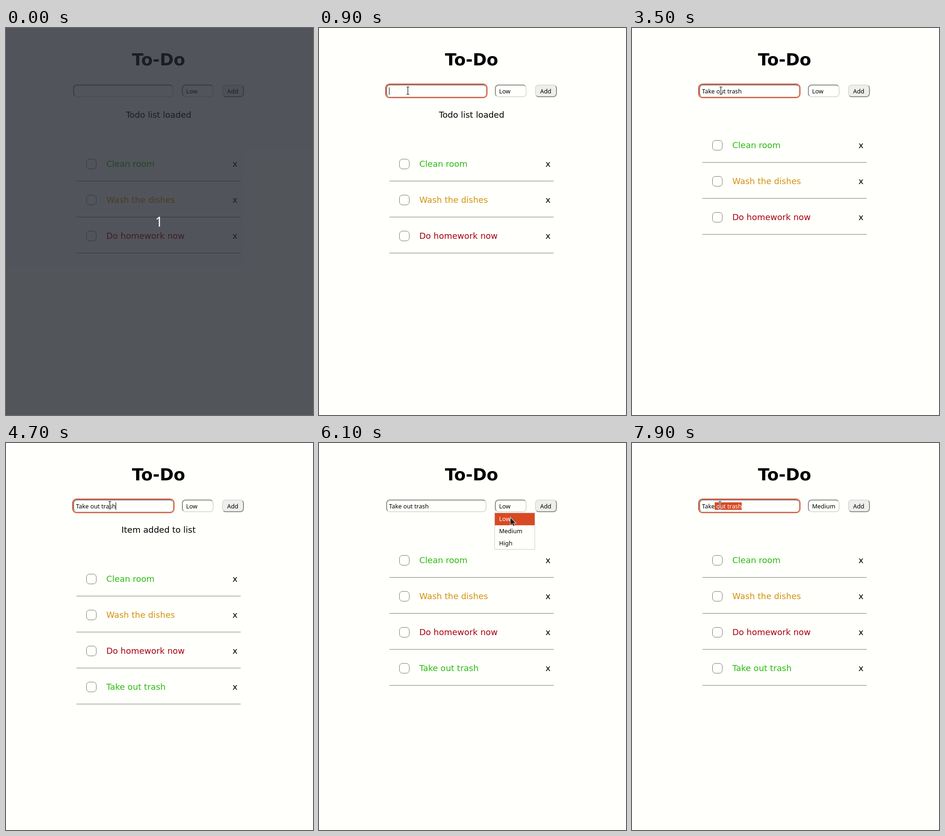
Animation of 658 by 828 pixels, one loop 8000 ms. Source, as an HTML page:

```html
<!DOCTYPE html>
<html lang="en">
<head>
<meta charset="utf-8">
<title>To-Do</title>
<style>
  html, body { margin: 0; width: 100%; height: 100%; overflow: hidden; background: #fffffc; }
  #stage { position: relative; width: 658px; height: 828px; overflow: hidden; }
  #stage > * { position: absolute; box-sizing: border-box; }
  .box { top: 121px; height: 27px; border: 2px solid; border-radius: 8px;
         border-color: #8f908c #dddeda #dddeda #8f908c; }
  #field { left: 144px; width: 215px; }
  #select { left: 377px; width: 68px; }
  #button { left: 463px; width: 47px; background: #eeefec;
            border-color: #dddeda #8f908c #8f908c #dddeda; }
  #ring { left: 142px; top: 119px; width: 219px; height: 31px;
          border: 2px solid #d2492a; border-radius: 9px; }
  svg { left: 0; top: 0; }
  text { font: 18px "DejaVu Sans", sans-serif; white-space: pre; }
  .ui { font: 12.8px "Noto Sans", sans-serif; }
</style>
</head>
<body>
<div id="stage">
  <div id="field" class="box"></div>
  <div id="select" class="box"></div>
  <div id="button" class="box"></div>
  <div id="ring"></div>
  <svg width="658" height="828" viewBox="0 0 658 828">
    <text x="327" y="79.5" text-anchor="middle" style="font-size:36px;font-weight:bold">To-Do</text>
    <rect id="mark" y="127" height="16" fill="#d84a24"/>
    <text class="ui" x="150" y="140"><tspan id="typed"></tspan><tspan id="picked" fill="#fff"></tspan></text>
    <rect id="caret" y="127" width="1" height="16"/>
    <text id="choice" class="ui" x="386" y="140"></text>
    <text class="ui" x="474" y="140">Add</text>
    <text id="note" x="327" y="192" text-anchor="middle"></text>
    <g id="list"></g>
    <g id="menu">
      <rect x="376.5" y="149.5" width="86" height="78" fill="#fffffc" stroke="#c8c8c4"/>
      <rect id="hover" x="377" width="85" height="26" fill="#d84a24"/>
    </g>
    <g id="arrow">
      <path d="M0 0V15.5L3.8 12.2L6.4 17.6L8.8 16.4L6.3 11.2H11Z" fill="#222224" stroke="#fff" stroke-width="1.6" paint-order="stroke"/>
    </g>
    <g id="beam" fill="none">
      <path d="M-3 -8H-1Q0 -8 0 -7V7Q0 8 -1 8H-3M3 -8H1Q0 -8 0 -7M0 7Q0 8 1 8H3" stroke="#fff" stroke-width="3"/>
      <path d="M-3 -8H-1Q0 -8 0 -7V7Q0 8 -1 8H-3M3 -8H1Q0 -8 0 -7M0 7Q0 8 1 8H3" stroke="#111" stroke-width="1.2"/>
    </g>
    <g id="cover">
      <rect width="658" height="828" fill="#22262e" fill-opacity=".785"/>
      <text x="328" y="425" text-anchor="middle" fill="#fff" style="font:29px 'Noto Sans',sans-serif">1</text>
    </g>
  </svg>
</div>
<script>
const $ = id => document.getElementById(id);
const LOOP = 8000, STEP = 100, LEFT = 150;
const PHRASE = "Take out trash";
const GREEN = "#2bbb10", AMBER = "#d3920f", RED = "#a80010";

// [time, characters typed]
const KEYS = [[0, 0], [1600, 1], [1900, 2], [2000, 3], [2100, 4], [2200, 5], [2400, 7],
  [2600, 9], [2800, 10], [2900, 11], [3200, 13], [3300, 14]];

// [time, x, y] of the pointer
const PATH = [[200, 174, 79], [400, 174, 79], [500, 181, 104], [600, 190.5, 134],
  [4600, 190.5, 134], [4700, 222.5, 133], [4900, 306, 135], [5100, 385, 126], [5200, 404, 124],
  [5800, 404, 124], [6000, 407, 146], [6300, 417, 188], [6400, 417, 188], [6500, 409, 190],
  [7100, 409, 190], [7300, 350, 172], [7500, 279.5, 140], [7800, 279.5, 140], [7900, 188.5, 133]];

function add(parent, name, attrs, text) {
  const el = document.createElementNS("http://www.w3.org/2000/svg", name);
  for (const k in attrs) el.setAttribute(k, attrs[k]);
  if (text) el.textContent = text;
  parent.appendChild(el);
  return el;
}

const rows = [["Clean room", GREEN], ["Wash the dishes", AMBER], ["Do homework now", RED], [PHRASE, GREEN]]
  .map(([label, color], i) => {
    const g = add($("list"), "g", { transform: `translate(0 ${77 * i})` });
    add(g, "rect", { x: 172.5, y: 280.5, width: 21, height: 21, rx: 6.5, fill: "none", stroke: "#777874" });
    add(g, "text", { x: 215, y: 297, fill: color }, label);
    add(g, "text", { x: 485.5, y: 297 }, "x");
    add(g, "rect", { x: 151, y: 327, width: 352, height: 1, fill: "#7b7c78" });
    return g;
  });

const options = ["Low", "Medium", "High"].map((label, i) =>
  add($("menu"), "text", { class: "ui", x: 386, y: 167 + 26 * i }, label));

const show = (el, on) => { el.style.display = on ? "" : "none"; };
const within = (t, a, b) => t >= a && t < b;

function pointerAt(t) {
  const n = PATH.findIndex(p => p[0] > t);
  if (n < 0) return PATH[PATH.length - 1].slice(1);
  const a = PATH[n - 1], b = PATH[n], k = (t - a[0]) / (b[0] - a[0]);
  return [a[1] + (b[1] - a[1]) * k, a[2] + (b[2] - a[2]) * k];
}

function drawField(t) {
  const focus = within(t, 900, 5500) || t >= 7700;
  const count = KEYS.filter(k => k[0] <= t).pop()[1];
  const selecting = t >= 7900;
  const split = selecting ? 4 : count;
  $("typed").textContent = PHRASE.slice(0, split);
  $("picked").textContent = PHRASE.slice(split, count);
  const end = LEFT + (count ? $("typed").parentNode.getComputedTextLength() : 0);
  const start = LEFT + (split ? $("typed").getComputedTextLength() : 0);
  show($("mark"), selecting);
  $("mark").setAttribute("x", start);
  $("mark").setAttribute("width", Math.max(0, end - start));
  $("caret").setAttribute("x", Math.round(end));
  show($("caret"), focus && !selecting && !within(t, 2200, 2400) && !within(t, 3500, 4700));
  show($("ring"), focus);
}

function drawPointer(t) {
  const seen = t >= PATH[0][0];
  const [x, y] = seen ? pointerAt(t) : [0, 0];
  const overField = within(x, 144, 360) && within(y, 121, 149);
  for (const [id, on] of [["arrow", !overField], ["beam", overField]]) {
    show($(id), seen && on);
    $(id).setAttribute("transform", `translate(${x} ${y})`);
  }
  const row = y < 175 ? 0 : 1;
  $("hover").setAttribute("y", 150 + 26 * row);
  options.forEach((o, i) => o.setAttribute("fill", i === row ? "#fff" : "#000"));
}

function draw(now) {
  const t = Math.floor((now % LOOP) / STEP) * STEP;
  const added = t >= 3800;
  const note = t < 2400 ? "Todo list loaded" : within(t, 3800, 5400) ? "Item added to list" : "";
  $("note").textContent = note;
  $("list").setAttribute("transform", `translate(0 ${note ? 0 : -40})`);
  show(rows[3], added);
  $("choice").textContent = t < 7000 ? "Low" : "Medium";
  show($("menu"), within(t, 5500, 6900));
  show($("cover"), t < 100);
  drawField(t);
  drawPointer(t);
}

const begin = performance.now();
function tick() {
  draw(performance.now() - begin);
  requestAnimationFrame(tick);
}
tick();
</script>
</body>
</html>
```
